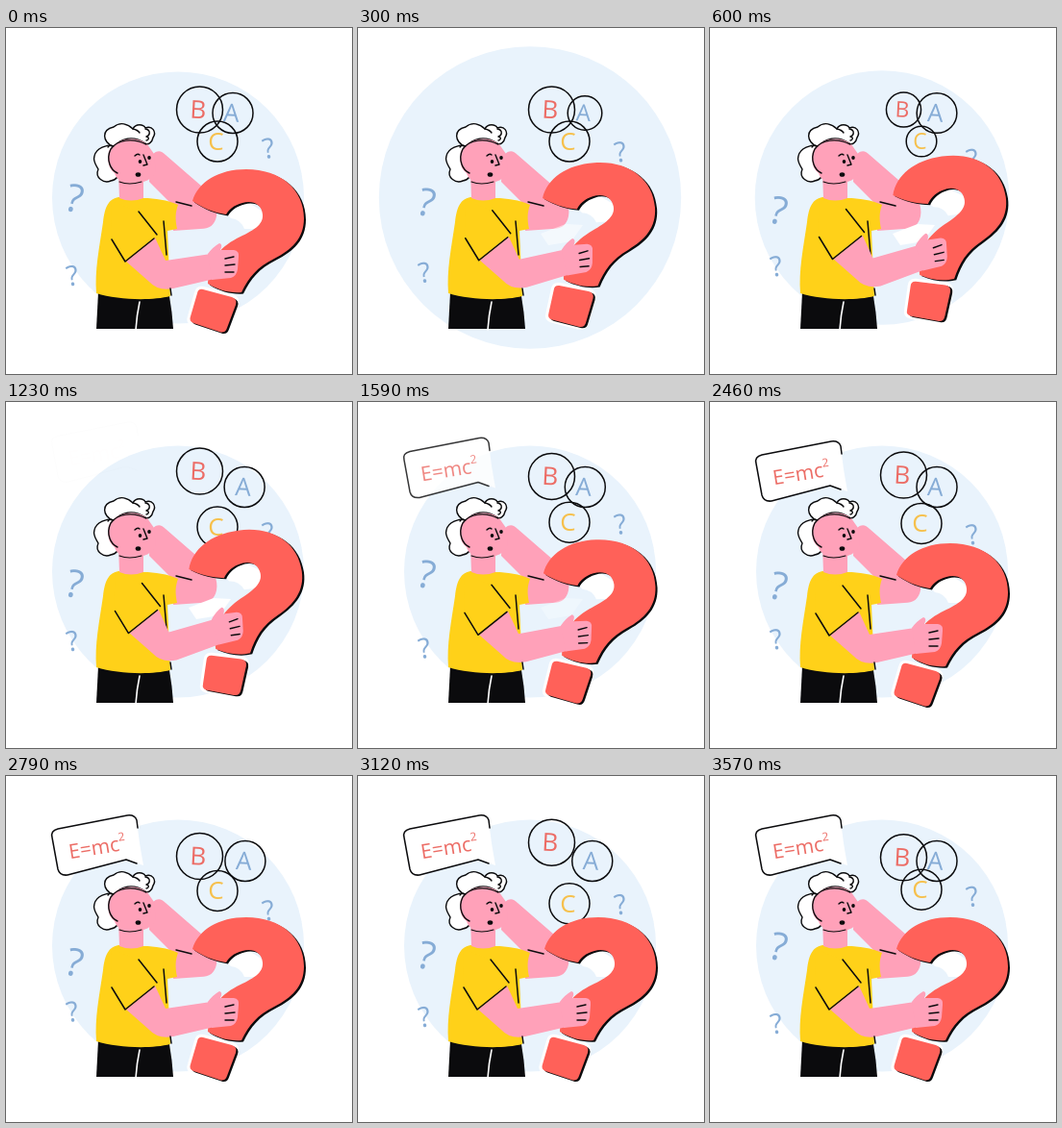
Animation, 360 px wide and 360 px high, one loop 3.6 s. Source, as an HTML page with a canvas:

```html
<!DOCTYPE html>
<html lang="en">
<head>
<meta charset="utf-8">
<title>Thinking it over</title>
<style>
  html, body { margin: 0; width: 100%; height: 100%; overflow: hidden; background: #fff; }
  canvas { display: block; width: 360px; height: 360px; }
</style>
</head>
<body>
<canvas id="stage"></canvas>
<script>
const LOOP = 3600, STEP = 30;
const INK = '#0b0b0d', PINK = '#ffa1b9', RED = '#ff6159', YELLOW = '#ffd119',
      SKY = '#e9f3fc', BLUE = '#86acd6', CORAL = '#ec6d66', GOLD = '#f6c04c';
const FONT = '"Open Sans", "Noto Sans", sans-serif';

const canvas = document.getElementById('stage');
const ctx = canvas.getContext('2d');
const ratio = window.devicePixelRatio || 1;
canvas.width = canvas.height = 360 * ratio;

const shapes = {
  bubble: 'M143 93 L125 87 L64 103 Q56 104 54 97 L48 64 Q46 57 54 55 L126 41 Q134 40 136 46 L139 70 Z',
  bubbleEdge: 'M136 91 L125 87 L64 103 Q56 104 54 97 L48 64 Q46 57 54 55 L126 41 Q134 40 136 46 L137 54',
  raisedArm: 'M150 137 C153 128 160 125 166 132 L204 165 C216 174 221 185 219 196 C217 205 212 209 202 209 L174 211 L174 185 L149 160 Z',
  pants: 'M96 275 L170 279 Q173 296 174 313 L94 313 Z',
  shirt: 'M117 176 C107 178 103 185 101 202 C97 229 92 253 94 276 C116 283 151 284 171 279 L168 211 L178 209 C176 199 176 192 179 184 C168 179 155 177 143 177 Z',
  sleeve: 'M110 180 L138 191 L157 217 L124 244 L109 219 Z',
  neck: 'M117 150 L118 177 Q130 182 143 177 L143 158 Z',
  face: 'M107 128 C115 114 136 112 147 121 L154 131 L156 150 C150 160 139 163 127 160 C117 160 114 155 113 151 Q104 145 107 128 Z',
  hairTop: 'M112 124 C100 118 99 106 112 103 C119 97 127 100 132 105 C135 99 143 100 145 104 C152 101 157 108 153 114 C152 119 148 122 145 120 C132 111 119 115 112 124 Z',
  hairSide: 'M115 122 C104 121 94 125 92 133 C90 140 95 144 96 147 C92 156 102 162 109 159 C115 158 118 154 116 149 L112 130 Z',
  hairLines: 'M145 105 C151 106 150 112 146 113 C150 114 148 117 146 117 M132 105 Q137 106 139 109 M146 121 C132 114 116 116 109 126 Q105 134 108 142 Q110 148 116 151 M106 124 Q108 121 112 123',
  faceLines: 'M143 132 L147 142 L143 143 M134 133 Q137 130 139 132',
  question: 'M194 180 C200 160 221 147 250 147 C286 147 310 168 310 198 C310 219 297 231 279 240 C261 249 253 259 245 275 C234 276 221 273 210 266 C211 241 222 229 240 219 C257 211 268 205 267 194 C266 183 256 179 246 182 C237 184 231 190 229 194 C216 192 204 187 194 180 Z',
  hole: 'M227 191 L247 178 L270 193 L262 209 L248 209 Q244 199 234 198 Z',
  gap: 'M190 214 L216 204 L234 205 L222 222 L198 226 Z',
  dot: 'M205 272 L235 280 Q241 282 239 288 L230 312 Q228 318 222 316 L195 307 Q190 305 192 300 L199 276 Q200 271 205 272 Z',
  hand: 'M210 235 Q215 228 222 224 Q226 225 223 231 L237 231 Q243 232 242 238 L241 251 Q240 258 234 260 L214 262 Z',
  fingers: 'M228 240 L237 238 M228 247 L238 246 M228 254 L237 254'
};
for (const key in shapes) shapes[key] = new Path2D(shapes[key]);

const clamp = x => Math.min(1, Math.max(0, x));
const ease = x => (1 - Math.cos(Math.PI * clamp(x))) / 2;
const ramp = (t, from, to) => ease((t - from) / (to - from));
const pulse = (t, from, peak, to) => ramp(t, from, peak) - ramp(t, peak, to);

// Three out-and-back swings, then rest.
function swing(t, start, period) {
  const cycles = (t - start) / period;
  return cycles < 0 || cycles > 3 ? 0 : (1 - Math.cos(2 * Math.PI * cycles)) / 2;
}

function fill(path, color) {
  ctx.fillStyle = color;
  ctx.fill(path);
}

function line(path, width = 1.5, color = INK) {
  ctx.strokeStyle = color;
  ctx.lineWidth = width;
  ctx.stroke(path);
}

function disc(x, y, rx, ry = rx, color = INK) {
  ctx.fillStyle = color;
  ctx.beginPath();
  ctx.ellipse(x, y, rx, ry, 0, 0, 2 * Math.PI);
  ctx.fill();
}

function label(text, x, y, size, color, degrees = 0, weight = 500) {
  ctx.save();
  ctx.translate(x, y);
  ctx.rotate(degrees * Math.PI / 180);
  ctx.font = `${weight} ${size}px ${FONT}`;
  ctx.textAlign = 'center';
  ctx.fillStyle = color;
  ctx.fillText(text, 0, size * 0.36);
  ctx.restore();
}

function ring(letter, x, y, radius, scale, color, degrees) {
  const circle = new Path2D();
  circle.arc(x, y, radius * scale, 0, 2 * Math.PI);
  line(circle);
  label(letter, x - 1.5, y - 0.5, 26 * (1 + scale) / 2, color, degrees);
}

function drawBackground(t) {
  disc(179, 176.5, 131 * (1 + 0.2 * pulse(t, 0, 300, 650)), undefined, SKY);
  const drift = (1 - Math.cos(2 * Math.PI * t / 1800)) / 2;
  label('?', 71.5, 177 + 17 * drift, 40, BLUE, 13);
  label('?', 69, 257.5 - 13 * drift, 29, BLUE, -10);
  label('?', 273, 125 + 15 * drift, 29, BLUE, -10);
}

function drawRings(t) {
  const spread = swing(t, 912, 895);
  const late = 1 - 0.33 * pulse(t, 450, 675, 900);
  const early = 1 - 0.33 * pulse(t, 200, 410, 620);
  ring('B', 201.5, 85 - 16 * spread, 24, late, CORAL, 3);
  ring('A', 236 + 15 * swing(t, 650, 900), 88.5, 21, early, BLUE, 3);
  ring('C', 220, 118 + 15 * spread, 21, late, GOLD, 0);
}

function drawBubble(t) {
  const shown = ramp(t, 1200, 1740);
  if (!shown) return;
  ctx.save();
  ctx.globalAlpha = shown;
  ctx.translate(0, -20 * (1 - shown));
  fill(shapes.bubble, '#fff');
  line(shapes.bubbleEdge);
  label('E=mc', 91.5, 74.5, 21, CORAL, -9);
  label('2', 120, 63, 12, CORAL, -9);
  ctx.restore();
}

function drawPerson() {
  fill(shapes.raisedArm, PINK);
  fill(shapes.pants, INK);
  line(new Path2D('M139 285 Q136 299 135 314'), 1.6, '#fff');
  fill(shapes.shirt, YELLOW);
  line(new Path2D('M164 201 L167 236 M177 181 L193 185'));
  for (const part of ['hairSide', 'hairTop']) {
    fill(shapes[part], '#fff');
    line(shapes[part], 1.4);
  }
  fill(shapes.neck, PINK);
  fill(shapes.face, PINK);
  line(new Path2D('M118 160 Q128 164 141 160'), 1.2);
  line(shapes.hairLines, 1.4);
  line(shapes.faceLines, 1.4);
  disc(139.5, 139, 1.8, 2.1);
  disc(149, 135, 1.8, 2.1);
  disc(137.5, 152.5, 2.8, 2.3);
}

function drawQuestion() {
  fill(shapes.hole, '#fff');
  line(shapes.dot, 6, '#fff');
  for (const part of ['question', 'dot']) {
    ctx.save();
    ctx.translate(2, 1.5);
    fill(shapes[part], INK);
    ctx.restore();
    fill(shapes[part], RED);
  }
}

function drawHeldQuestion(t) {
  const lift = ramp(t, 0, 600) - ramp(t, 1200, 1800);
  const held = new DOMMatrix()
    .translate(250, 210 - 14 * lift)
    .rotate(-8 * lift)
    .translate(-250, -210);
  const arm = new DOMMatrix().translate(3.5 * lift, -2.5 * lift);
  const within = (matrix, paint) => {
    ctx.save();
    ctx.transform(matrix.a, matrix.b, matrix.c, matrix.d, matrix.e, matrix.f);
    paint();
    ctx.restore();
  };

  ctx.globalAlpha = lift;
  fill(shapes.gap, '#fff');
  ctx.globalAlpha = 1;
  within(held, drawQuestion);

  const wrist = arm.inverse().multiply(held);
  const upper = wrist.transformPoint(new DOMPoint(213, 235));
  const lower = wrist.transformPoint(new DOMPoint(217, 261));
  within(arm, () => {
    fill(new Path2D(`M124 242 L155 218 L166 242 L${upper.x} ${upper.y}
      L${lower.x} ${lower.y} L174 271 Q158 274 149 264 Z`), PINK);
    fill(shapes.sleeve, YELLOW);
    line(new Path2D('M110 220 L124 243 L154 219 M157 215 L138 191'));
  });
  line(new Path2D('M171 271 L172 278'));
  within(held, () => {
    fill(shapes.hand, PINK);
    line(shapes.fingers, 1.4);
  });
}

function draw(now) {
  const t = Math.floor((now % LOOP) / STEP) * STEP;
  ctx.setTransform(ratio, 0, 0, ratio, 0, 0);
  ctx.lineCap = ctx.lineJoin = 'round';
  ctx.fillStyle = '#fff';
  ctx.fillRect(0, 0, 360, 360);
  drawBackground(t);
  drawRings(t);
  drawBubble(t);
  drawPerson();
  drawHeldQuestion(t);
}

const start = performance.now();
function tick() {
  draw(performance.now() - start);
  requestAnimationFrame(tick);
}
tick();
</script>
</body>
</html>
```
